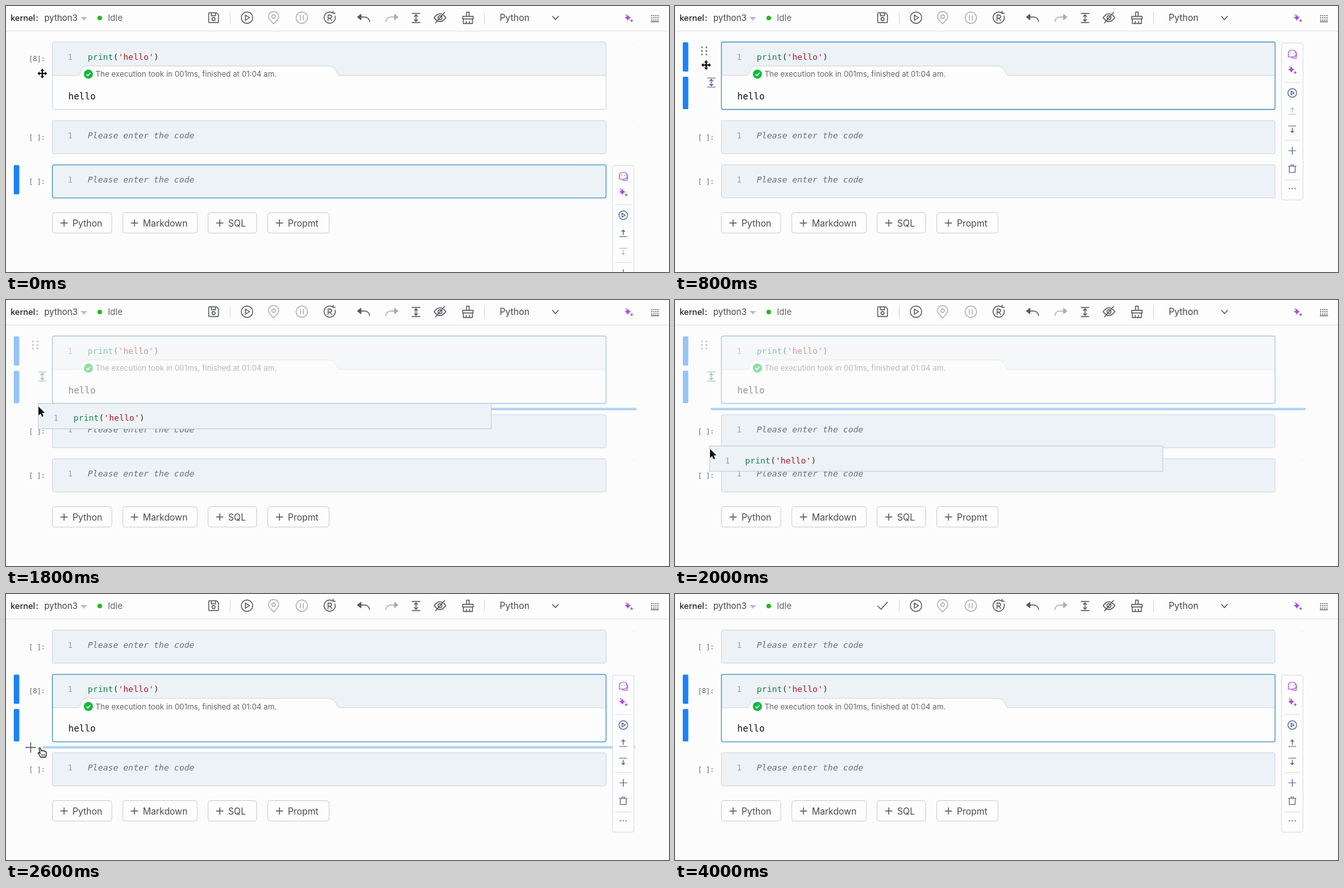
These frames come from a looping animation (1022x410 px, 4.2 s). An HTML page:

```html
<!DOCTYPE html>
<html lang="en">
<head>
<meta charset="utf-8">
<title>Notebook cell drag</title>
<style>
  html, body { margin: 0; width: 100%; height: 100%; overflow: hidden; background: #fcfcfc; }
  svg { display: block; position: absolute; left: 0; top: 0; }
  text { white-space: pre; font-family: Inter, "Open Sans", sans-serif; }
  .mono { font-family: "DejaVu Sans Mono", "Noto Sans Mono", monospace; }
  .i { fill: none; stroke: #55585d; stroke-width: 1.4; stroke-linecap: round; stroke-linejoin: round; }
  .off { stroke: #acadb0; }
  .tool { stroke: #4c648c; stroke-width: 1.2; }
  .tool.off { stroke: #b7c0cb; }
  .purple { stroke: #a555dc; }
</style>
</head>
<body>
<svg width="1022" height="410" viewBox="0 0 1022 410">
  <g id="page"></g>
  <g id="cells"></g>
  <g id="overlay"></g>
</svg>
<script>
const STEP = 200, STEPS = 21;
const CODE_BG = '#edf2f7', EDGE = '#ccd8e1', LINE = '#aed4f6';
const $ = id => document.getElementById(id);

const text = (x, y, s, size, fill, extra = '') =>
  `<text x="${x}" y="${y}" font-size="${size}" fill="${fill}" ${extra}>${s}</text>`;
const mono = (x, y, s, size, fill, extra = '') => text(x, y, s, size, fill, `class="mono" ${extra}`);
const rect = (x, y, w, h, fill, extra = '') =>
  `<rect x="${x}" y="${y}" width="${w}" height="${h}" fill="${fill}" ${extra}/>`;
const icon = (x, y, d, cls = '') =>
  `<path class="i ${cls}" transform="translate(${x} ${y})" d="${d}"/>`;
const ring = r => `M${-r} 0a${r} ${r} 0 1 0 ${2 * r} 0a${r} ${r} 0 1 0 ${-2 * r} 0z`;
const star = (x, y, r) => {
  const k = r * .22;
  return `<path fill="#a74ddd" d="M${x} ${y - r}Q${x + k} ${y - k} ${x + r} ${y}Q${x + k} ${y + k} ${x} ${y + r}Q${x - k} ${y + k} ${x - r} ${y}Q${x - k} ${y - k} ${x} ${y - r}z"/>`;
};
const sparkle = (x, y) => star(x - 1.5, y - .5, 5) + star(x + 4.5, y + 4, 2.6) + star(x - 4, y - 4.5, 1.6);
const plus = r => `M${-r} 0H${r}M0 ${-r}V${r}`;
const FIT = 'M-6 -7H6M-6 7H6M0 -4.5V4.5M-2.5 -2.5L0 -5L2.5 -2.5M-2.5 2.5L0 5L2.5 2.5';
const SAVE = 'M-7.5 -6.5Q-7.5 -7.5 -6.5 -7.5H4.5L7.5 -4.5V6.5Q7.5 7.5 6.5 7.5H-6.5Q-7.5 7.5 -7.5 6.5zM-3.5 -7.5V-3H3V-7.5' + 'M-2.4 2.2a2.4 2.4 0 1 0 4.8 0a2.4 2.4 0 1 0 -4.8 0';
const CHECK = 'M-7.5 .5L-2.5 5.5L7.5 -5.5';

function button([x, w, label]) {
  return rect(x + .5, 318.5, w, 31.5, '#fdfdfd', 'rx="4" stroke="#cbcfd4"') +
    icon(x + 18.5, 334.5, plus(5), 'thin') + text(x + 31.5, 339.5, label, 13.8, '#4a4a4a');
}

function page() {
  let grid = '';
  for (let n = 0; n < 12; n++) grid += rect(994.5 + n % 4 * 3.2, 14 + (n >> 2) * 3.4, 1.7, 1.6, '#55585d');
  const undo = 'M-4 -5.5L-9 -1.5L-4 2.5zM-5 -1.5H2Q8.5 -1 9.5 5.5';
  const redo = 'M4 -5.5L9 -1.5L4 2.5zM5 -1.5H-2Q-8.5 -1 -9.5 5.5';
  return rect(0, 0, 1022, 38, '#fdfdfd') + rect(0, 38, 1022, 1, '#e0e2e5') +
    text(7, 23, 'kernel', 12.8, '#222', 'font-weight="500"') + text(46, 23, ':', 13, '#222', 'font-weight="500"') +
    text(59, 23, 'python3', 13.2, '#444') +
    '<path d="M115 17H125L120 22.5z" fill="#b9bbbd"/><circle cx="144.5" cy="18.5" r="3.6" fill="#2ab71c"/>' +
    text(157, 23, 'Idle', 13.4, '#666') +
    rect(345, 9, 1, 19, '#d6d8da') + rect(737, 9, 1, 19, '#d6d8da') +
    icon(371.5, 18, ring(8.8) + 'M-2.5 -4V4L4 0z') +
    icon(412.5, 18, 'M0 9.5Q-8 2 -8 -1.5A8 8 0 0 1 8 -1.5Q8 2 0 9.5zM-2.8 -1.5a2.8 2.8 0 1 0 5.6 0a2.8 2.8 0 1 0 -5.6 0', 'off') +
    icon(456, 18, ring(8.8) + 'M-2.3 -3.5V3.5M2.3 -3.5V3.5', 'off') +
    icon(499, 18, 'M5 -7A8.6 8.6 0 1 0 8.2 -2.5M5.2 -10V-6.8H8.4M-2.5 4.2V-4H.5A2.4 2.4 0 0 1 .5 .8H-2.5M.5 .8L3 4.2') +
    `<g fill="#55585d">${icon(551, 18.5, undo).replace('class="i ', 'style="fill-rule:evenodd" class="i ')}</g>` +
    '<path d="M547 13L542 17L547 21z" fill="#55585d"/><path d="M599 13L604 17L599 21z" fill="#acadb0"/>' +
    icon(595, 18.5, redo, 'off') + icon(632, 18.5, FIT) +
    icon(669, 18, 'M-9 0Q0 -12 9 0Q0 12 -9 0zM-3 0a3 3 0 1 0 6 0a3 3 0 1 0 -6 0M7 -8L-7 8') +
    icon(712, 18, 'M-8 -2H8V2H-8zM-2 -2V-8.5H2V-2M-7 2V9H7V2M-2.5 9V5.5M2.5 9V5.5') +
    text(761, 23, 'Python', 13.8, '#444') + icon(847, 18.5, 'M-4.5 -2.5L0 2.5L4.5 -2.5') +
    sparkle(960, 18.5) + grid + rect(994, 23.6, 12.5, 1.3, '#55585d') +
    [[71, 91.5, 'Python'], [179.5, 115, 'Markdown'], [311, 75, 'SQL'], [403, 94.5, 'Propmt']].map(button).join('');
}

const printCode = (x, y) => mono(x, y,
  `<tspan fill="#15824f">print</tspan>(<tspan fill="#ab1a22">'hello'</tspan>)`, 13, '#333');

function executed(y) {
  const tab = `M112 ${y + 51.5}Q114.5 ${y + 50} 115 ${y + 46}Q117 ${y + 37} 126 ${y + 37}H496Q506 ${y + 37} 509.5 ${y + 46}Q511 ${y + 50} 513 ${y + 51.5}`;
  return rect(72, y + 51.5, 852.5, 51.5, '#fdfdfd') +
    `<path d="M72 ${y + 51.5}H112M513 ${y + 51.5}H924.5" stroke="${EDGE}"/>` +
    `<path d="${tab}" fill="#fdfdfd" stroke="${EDGE}"/>` +
    `<circle cx="127" cy="${y + 49.5}" r="7" fill="#12b83d"/>` +
    `<path d="M124 ${y + 49.7}l2.2 2.2l4 -4.3" fill="none" stroke="#fff" stroke-width="1.5"/>` +
    text(138, y + 53.8, 'The execution took in 001ms, finished at 01:04 am.', 11.7, '#666') +
    mono(96, y + 88, 'hello', 14, '#111') + printCode(126, y + 27);
}

function cell(y, { output, active, hover, dragged }) {
  const h = output ? 104 : 51;
  let s = rect(71.5, y, 853.5, h, CODE_BG, 'rx="3"') + mono(95, y + 27, '1', 13, '#9aa5b3');
  s += output ? executed(y) :
    mono(126, y + 27, 'Please enter the code', 13, '#6c7075', 'font-style="italic"');
  s += rect(71.5, y, 853.5, h, 'none', `rx="3" stroke="${active ? '#4c96c4' : EDGE}" stroke-width="${active ? 1.3 : 1}"`);
  if (active) {
    s += rect(12, y + .5, 8.5, 45, '#1b82f7', 'rx="1.5"');
    if (output) s += rect(12, y + 53.5, 8.5, 50, '#1b82f7', 'rx="1.5"');
  }
  if (hover) {
    for (let n = 0; n < 6; n++) s += `<circle cx="${41.5 + n % 2 * 7}" cy="${y + 8.2 + (n >> 1) * 5.5}" r="1.3" fill="#5d7389"/>`;
    s += icon(56, y + 62.5, FIT, 'tool');
  } else s += mono(35.3, y + 29.5, output ? '[8]:' : '[ ]:', 10.4, '#566479');
  if (!active || dragged) s += rect(967, y + 1.5, 1, 1, '#ccd0d4');
  return dragged ? `<g opacity=".45">${s}</g>` : s;
}

function toolbar(y, canUp, canDown) {
  const x = 951.5, at = (dy, d, cls = '') => icon(x, y + dy, d, 'tool ' + cls);
  const up = 'M-5.5 5H5.5M0 2V-5M-2.3 -2.8L0 -5L2.3 -2.8';
  const down = 'M-5.5 -5H5.5M0 -2V5M-2.3 2.8L0 5L2.3 2.8';
  return rect(935, y, 33, 242, '#fdfdfd', 'rx="3" stroke="#d5dbe3"') +
    at(17, 'M-6 4.5V-1A5 5 0 0 1 -1 -6H1A5.2 5.2 0 0 1 1 4.5zM5 -2.5Q8 1 6 4V6.5H1.5Q-.5 6.5 -1.5 4.5M-3 -1H-2.5M2 -1H2.5', 'purple') +
    sparkle(x, y + 41.5) +
    [60.5, 149.5, 210.5].map(dy => rect(939, y + dy, 25, 1, '#d9dee5')).join('') +
    at(77, ring(6.7) + 'M-1.8 -3V3L3 0z') + at(105, up, canUp ? '' : 'off') + at(133, down, canDown ? '' : 'off') +
    at(166, plus(5.5)) + at(194, 'M-6 -4H6M-2 -4V-6H2V-4M-4.5 -4V5.5H4.5V-4') +
    [-4.5, 0, 4.5].map(dx => `<circle cx="${x + dx}" cy="${y + 224.5}" r=".9" fill="#4c648c"/>`).join('');
}

const dropLine = (x, y, w) => rect(x, y, w, 3.8, LINE, 'rx="1"');

function ghost(x, y) {
  return rect(x, y, 698.5, 39, CODE_BG, 'stroke="#c3cad1"') +
    mono(x + 23.5, y + 26.5, '1', 13, '#9aa5b3') + printCode(x + 54.5, y + 26.5);
}

const pointers = {
  move: 'M0 -7.5L3 -4H1.1V-1.1H4V-3L7.5 0L4 3V1.1H1.1V4H3L0 7.5L-3 4H-1.1V1.1H-4V3L-7.5 0L-4 -3V-1.1H-1.1V-4H-3z',
  arrow: 'M0 0V14L3.2 11L5.4 16L7.8 15L5.6 10.1H10z',
  hand: 'M-2.5 7.5L-6 2.5Q-7.2 .5 -5.3 .3L-3.3 2L-5 -5.5Q-4.8 -8 -3 -6.5L-1.5 -2Q0 -3.8 1.2 -2Q3 -3 3.8 -1.2Q6 -1.8 6.2 .8Q6.8 4.5 5 7.5z'
};
function pointer(kind, x, y) {
  if (!kind) return '';
  const hand = kind === 'hand';
  const paint = hand ? 'fill="#fff" stroke="#222" stroke-width="1.3"' :
    'fill="#111" stroke="#fff" stroke-width="1.4" paint-order="stroke"';
  const lines = hand ? '<path d="M-1 2.5V5.5M1.3 2.5V5.5M3.5 2.5V5.5" stroke="#222"/>' : '';
  return `<g transform="translate(${x} ${y})"><path d="${pointers[kind]}" ${paint} stroke-linejoin="round"/>${lines}</g>`;
}

// Pointer table: first step, kind, x, y
const moves = [
  [0, 'move', 56, 104], [1, 'move', 52, 98], [2, 'move', 48, 91], [5, 'move', 47, 91],
  [7, 'move', 46, 90], [8, 'move', 44.5, 89.5], [9, 'arrow', 50, 164], [10, 'arrow', 54, 229.5],
  [11, 'arrow', 54, 237], [13, 'hand', 56, 244], [17, '', 0, 0]
];

function draw(step) {
  const selected = step >= 4, dragging = step >= 9 && step < 13, dropped = step >= 13;
  const first = { output: true, active: selected, hover: step >= 1 && !dropped, dragged: dragging };
  const [, kind, px, py] = moves.filter(m => m[0] <= step).pop();

  $('cells').innerHTML = icon(320, 18, step >= 18 ? CHECK : SAVE) +
    (dropped ? cell(55.5, {}) + cell(123.8, first) : cell(55.5, first) + cell(176.8, {})) +
    cell(244.8, { active: !selected });

  let top = '';
  if (dragging) {
    top += dropLine(55, step < 11 ? 166.3 : 234.5, 917);
    top += ghost(px - .5, step < 11 ? py - 4.5 : 235.8);
  } else {
    if (dropped && step < 17) top += dropLine(57, 234.5, 913) + icon(38, 236.5, plus(7.5));
    top += dropped ? toolbar(125, true, true) : selected ? toolbar(57, false, true) : toolbar(245.5, true, false);
  }
  $('overlay').innerHTML = top + pointer(kind, px, py);
}

$('page').innerHTML = page();
let shown = -1;
const start = performance.now();
function tick(now) {
  const step = Math.floor(Math.max(0, now - start) / STEP) % STEPS;
  if (step !== shown) draw(shown = step);
  requestAnimationFrame(tick);
}
draw(0);
requestAnimationFrame(tick);
</script>
</body>
</html>
```
